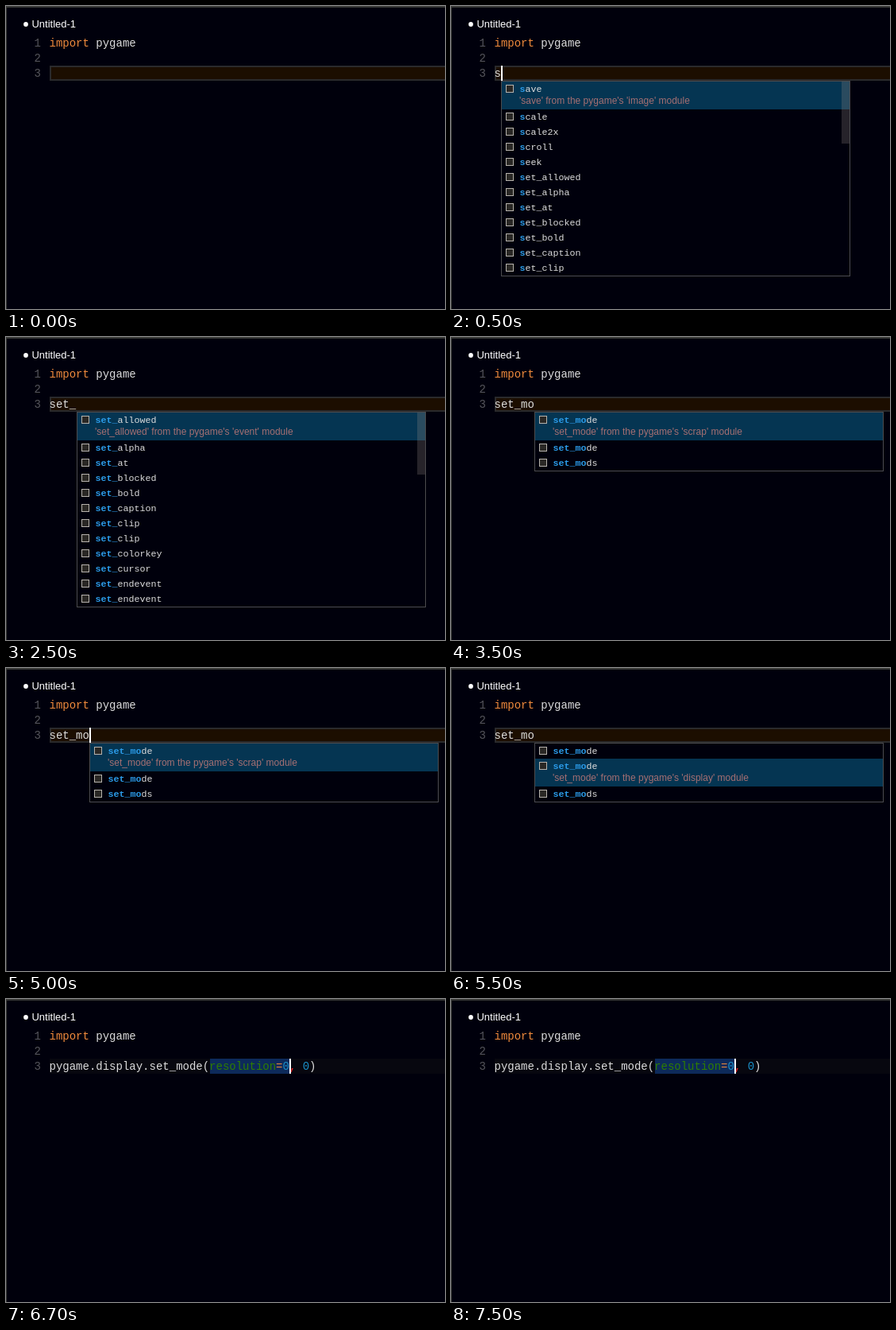
Animation, 553 px wide and 381 px high, one loop 8000 ms. Source, as an HTML page with a canvas:

```html
<!DOCTYPE html>
<html lang="en">
<head>
<meta charset="utf-8">
<title>Code completion</title>
<style>
  html, body { margin: 0; width: 100%; height: 100%; overflow: hidden; background: #00000c; }
  canvas { display: block; }
</style>
</head>
<body>
<canvas id="stage" width="553" height="381"></canvas>
<script>
const ctx = document.getElementById('stage').getContext('2d');
const LOOP = 8000, LEFT = 55, CHAR = 8.4, ITEM_CHAR = 7, ROW = 19, LINE_Y = 75;
const BG = '#00000c', WHITE = '#dcdcdc', ORANGE = '#f08a3c', MAGENTA = '#c800c8',
      GREEN = '#2f7d00', BLUE = '#1a8fc8', RED = '#f02020';
const CODE = '14px "Liberation Mono", monospace';
const ITEM = '11.66px "Liberation Mono", monospace';
const TITLE = '13px "Liberation Sans", sans-serif';
const NOTE = '12px "Liberation Sans", sans-serif';

const setters = ['allowed', 'alpha', 'at', 'blocked', 'bold', 'caption', 'clip', 'clip',
  'colorkey', 'cursor', 'endevent', 'endevent'].map(s => 'set_' + s);
const modes = ['set_mode', 'set_mode', 'set_mods'];
const call = [['pygame.display.set_mode(', WHITE], ['resolution', GREEN], ['=', ORANGE],
  ['0', BLUE], [',', RED], [' ', WHITE], ['0', BLUE], [')', WHITE]];

function menu(typed, items, module, picked = 0) {
  return { typed, items: items.slice(0, 12), module, picked, long: items.length >= 12 };
}
const menus = {
  s: menu('s', ['save', 'scale', 'scale2x', 'scroll', 'seek', ...setters], 'image'),
  se: menu('se', ['seek', ...setters], 'event'),
  set: menu('set', setters, 'event'),
  set_: menu('set_', setters, 'event'),
  m: menu('set_m', modes, 'scrap'),
  mo: menu('set_mo', modes, 'scrap'),
  display: menu('set_mo', modes, 'display', 1)
};

// Each step: start time, typed text, open menu
const steps = [
  [0, ''], [400, 's'], [500, 's', 's'], [700, 'se', 'se'], [900, 'set', 'set'],
  [2000, 'set_', 'set'], [2100, 'set_', 'set_'],
  [2900, 'set_m', 'set_'], [3000, 'set_mo', 'm'], [3100, 'set_mo', 'mo'],
  [5100, 'set_mo', 'display']
];
const INSERTED = 5700;
const caretFlips = [400, 1300, 1800, 2500, 2900, 3500, 4000, 4500, 5000, 5500,
  INSERTED, 6200, 6700, 7200, 7300];

const colX = n => LEFT + n * CHAR;

function rect(x, y, w, h, color) {
  ctx.fillStyle = color;
  ctx.fillRect(x, y, w, h);
}

function text(str, x, y, font, color) {
  ctx.font = font;
  ctx.fillStyle = color;
  ctx.fillText(str, x, y);
}

function code(str, col, line, color) {
  text(str, colX(col) - .5, 51 + line * ROW, CODE, color);
}

function frame(x, y, w, h, color, dash = []) {
  ctx.strokeStyle = color;
  ctx.lineWidth = 1;
  ctx.setLineDash(dash);
  ctx.strokeRect(x + .5, y + .5, w - 1, h - 1);
  ctx.setLineDash([]);
}

function drawEditor() {
  rect(0, 0, 553, 381, BG);
  rect(0, 0, 553, 2, '#393a37');
  rect(0, 0, 1, 381, '#393a37');
  ctx.fillStyle = '#fff';
  ctx.beginPath();
  ctx.arc(25, 23, 2.9, 0, Math.PI * 2);
  ctx.fill();
  text('Untitled-1', 32.4, 27, TITLE, '#fff');
  for (let i = 0; i < 3; i++) text(i + 1, 35.5, 51 + i * ROW, CODE, '#55555b');
  code('import', 0, 0, ORANGE);
  code('pygame', 7, 0, WHITE);
}

function drawIcon(x, y) {
  rect(x, y, 10, 10, '#2a2825');
  frame(x, y, 10, 10, '#8c8984');
  frame(x, y, 10, 10, '#dedad2', [1, 1]);
}

function drawMenu({ typed, items, module, picked, long }) {
  const x = Math.round(colX(typed.length)), top = 94;
  const h = items.length * ROW + 18;
  const textX = x + 23.5;
  rect(x, top, 440, h, BG);
  let y = top + 1;
  items.forEach((name, i) => {
    const on = i === picked;
    if (on) {
      rect(x + 1, y, 438, 35, '#053552');
      text(`'${name}' from the pygame's '${module}' module`, x + 23, y + 28, NOTE, '#a56f72');
    }
    drawIcon(x + 6, y + 4);
    text(typed, textX, y + 13, 'bold ' + ITEM, '#2b9be8');
    text(name.slice(typed.length), textX + typed.length * ITEM_CHAR, y + 13, ITEM, WHITE);
    y += on ? 35 : ROW;
  });
  if (long) rect(x + 429, top + 1, 10, 78, 'rgba(150,140,130,.25)');
  frame(x, top, 440, h, '#4c4c4e');
}

function drawTyping(t, caretOn) {
  const [, typed, open] = steps.filter(s => s[0] <= t).pop();
  rect(LEFT, LINE_Y, 510, ROW, '#1c0e00');
  ctx.strokeStyle = '#2a2a2c';
  ctx.lineWidth = 2;
  ctx.strokeRect(LEFT + 1, LINE_Y + 1, 510, ROW - 2);
  code(typed, 0, 2, typed === 'set' ? MAGENTA : WHITE);
  if (caretOn) drawCaret(typed.length);
  if (open) drawMenu(menus[open]);
}

function drawCall(t, caretOn) {
  const [from, to] = t >= 7300 && t < 7500 ? [38, 39] : [24, 36];
  rect(LEFT, LINE_Y, 498, ROW, '#07070f');
  rect(Math.round(colX(from)), LINE_Y, Math.round((to - from) * CHAR), ROW, '#0d2a5a');
  let col = 0;
  for (const [part, color] of call) {
    code(part, col, 2, color);
    col += part.length;
  }
  if (caretOn) drawCaret(to);
}

function drawCaret(col) {
  rect(Math.round(colX(col)), LINE_Y, 2, ROW, '#fff');
}

function draw(now) {
  const t = now % LOOP;
  const caretOn = caretFlips.filter(f => f <= t).length % 2 === 1;
  drawEditor();
  (t < INSERTED ? drawTyping : drawCall)(t, caretOn);
}

const start = performance.now();
function tick() {
  draw(performance.now() - start);
  requestAnimationFrame(tick);
}
tick();
</script>
</body>
</html>
```
